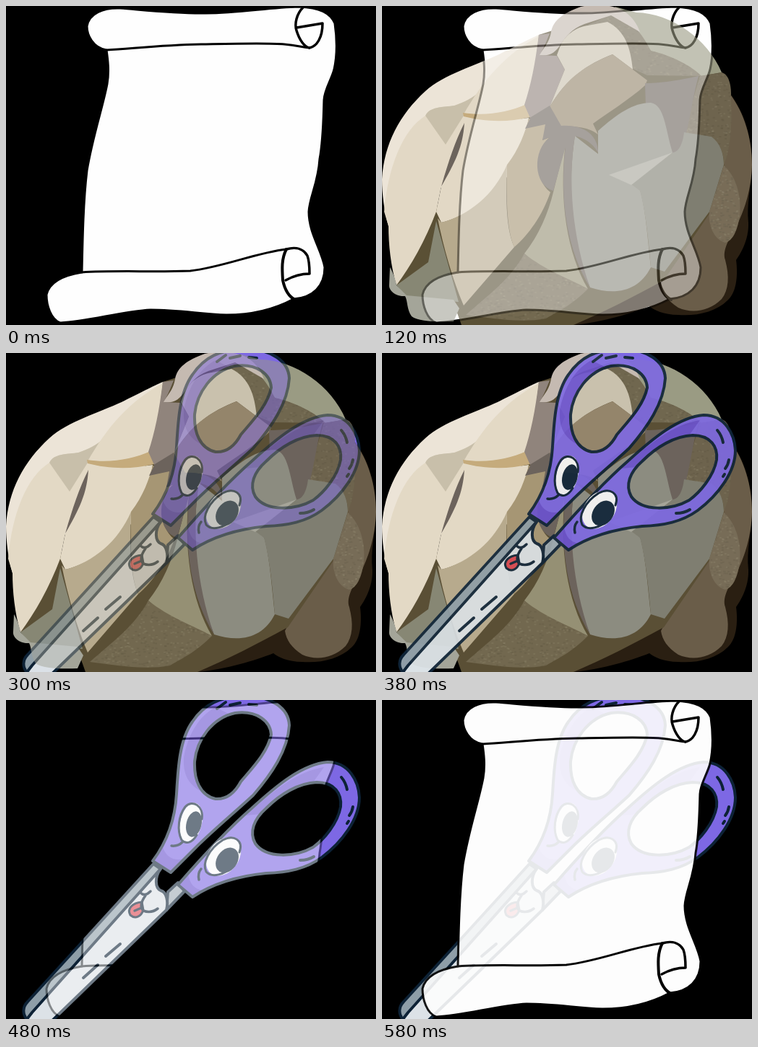
An HTML page with a canvas for the animation above (600 ms loop, 512 by 442 pixels).

```html
<!DOCTYPE html>
<html lang="en">
<head>
<meta charset="utf-8">
<title>Paper, rock, scissors</title>
<style>
html, body { margin: 0; width: 100%; height: 100%; overflow: hidden; background: #000; }
canvas { display: block; }
</style>
</head>
<body>
<canvas id="stage" width="512" height="442"></canvas>
<script>
const W = 512, H = 442;
const STEP = 20, FADE = 10, LOOP = 600;
const stage = document.getElementById('stage').getContext('2d');

function layer(paint) {
  const canvas = document.createElement('canvas');
  canvas.width = W;
  canvas.height = H;
  const c = canvas.getContext('2d');
  c.lineJoin = c.lineCap = 'round';
  paint(c);
  return canvas;
}

function fill(c, color, d) {
  c.fillStyle = color;
  c.fill(new Path2D(d), 'evenodd');
}

function line(c, color, width, d) {
  c.strokeStyle = color;
  c.lineWidth = width;
  c.stroke(new Path2D(d));
}

function shape(c, color, ink, width, d) {
  fill(c, color, d);
  line(c, ink, width, d);
}

function ellipse(c, color, x, y, rx, ry, degrees) {
  c.beginPath();
  c.ellipse(x, y, rx, ry, degrees * Math.PI / 180, 0, 7);
  c.fillStyle = color;
  c.fill();
}

// Rough stone: a flat facet with faint seeded specks.
function grain(c, color, d) {
  fill(c, color, d);
  c.save();
  c.clip(new Path2D(d));
  let seed = 7;
  const random = () => (seed = seed * 16807 % 2147483647) / 2147483647;
  for (let i = 0; i < 9000; i++) {
    c.fillStyle = i % 2 ? 'rgba(255,245,215,.06)' : 'rgba(30,20,0,.06)';
    c.fillRect(random() * W, random() * H, 3, 2);
  }
  c.restore();
}

function paintPaper(c) {
  const ink = '#000';
  shape(c, '#fefefe', ink, 3,
    'M139 61C120 58 112 40 112 28C115 10 135 2 158 3C195 6 230 10 270 10' +
    'C320 11 360 2 405 1C435 2 449 10 455 24C458 45 458 70 454 88' +
    'C450 103 441 115 440 130C439 160 439 185 434 212C432 245 420 265 419 285' +
    'C419 315 437 338 441 362C441 388 425 404 398 406C370 421 340 428 305 428' +
    'C270 427 240 421 200 421C160 423 115 437 75 439C62 434 56 415 56 400' +
    'C60 382 80 373 105 369C106 320 107 270 112 228C120 180 134 140 140 108C143 90 141 75 139 61Z');
  line(c, ink, 3, 'M139 61C175 59 215 54 270 53S365 51 385 53S408 57 420 58');
  line(c, ink, 3.5, 'M411 2C402 11 399 25 402 34C406 47 413 57 420 58C430 56 438 44 438 24L402 30');
  line(c, ink, 3, 'M105 369C150 366 205 369 255 367C300 362 345 342 388 337');
  line(c, ink, 4, 'M388 337C381 350 382 365 383 380C386 394 392 403 400 407');
  line(c, ink, 3.5, 'M388 337C402 333 412 337 417 346C420 354 420 362 420 371C408 371 396 375 387 380');
}

function paintRock(c) {
  const olive = '#5a4f35', plum = '#6c635c', cream = '#e3d9c5';
  // Shadowed back
  fill(c, '#2a1f12', 'M482 122C503 150 512 185 512 220C511 250 504 275 507 300C508 325 495 345 490 352C493 375 490 398 478 408C462 424 435 430 410 428C390 428 376 421 370 416C345 426 305 438 265 442L380 340Z');
  fill(c, '#6a5d49', 'M480 120C502 148 512 185 512 220C511 255 502 280 493 300C482 320 470 338 475 352C481 375 480 393 470 406C452 424 428 426 410 418C395 408 388 398 386 385L440 280Z');
  // Body
  fill(c, olive, 'M75 280L217 40L330 4L470 92L483 130L473 225L453 288L390 380C350 402 305 425 265 442H110L95 400L20 387Z');
  fill(c, '#ece4d7', 'M0 240C3 190 25 150 60 118C85 95 130 82 160 68C182 57 205 45 217 40L200 150L60 270L9 305C3 285 0 260 0 240Z');
  fill(c, cream, 'M3 285C8 225 28 172 60 152L88 190L132 120L113 163C100 200 92 225 82 250L75 285C60 325 40 360 20 387C12 360 9 330 9 305Z');
  fill(c, '#c8bfaa', 'M60 152C66 139 85 140 100 138C115 133 125 127 134 120L113 152L88 192Z');
  fill(c, cream, 'M113 150C138 105 172 65 217 42C213 80 207 112 197 138C178 148 150 153 113 150Z');
  fill(c, cream, 'M113 151C140 162 170 160 203 155C196 200 178 240 150 262C125 285 100 296 82 300L75 285L82 250C95 222 107 190 113 163Z');
  fill(c, '#c5ab7c', 'M112 148C145 153 175 147 200 136L205 154C172 162 140 160 113 153Z');
  fill(c, plum, 'M114 162C101 188 92 215 82 250C101 217 112 195 114 162Z');
  // Lower left
  fill(c, '#b7aa8d', 'M77 294L82 300C120 290 155 262 173 220C171 270 172 310 183 334L113 415C98 380 85 335 77 294Z');
  fill(c, '#a69674', 'M203 156L230 160L222 186L232 182C211 200 210 240 233 258C222 290 203 317 183 334C172 310 172 260 173 220C190 198 198 175 203 156Z');
  fill(c, '#878774', 'M75 298L106 410L35 405L20 387L64 355Z');
  fill(c, '#a4a599', 'M11 362C16 371 19 380 20 387L34 401L99 407L107 419L99 437C75 438 50 437 41 430C34 420 36 410 32 402C20 403 9 395 10 386Z');
  fill(c, '#959074', 'M254 190C244 270 257 345 285 392C255 380 222 368 197 343C217 318 230 287 237 258Z');
  grain(c, '#72684f', 'M197 343C225 366 260 378 285 392C265 412 250 420 227 433C190 440 150 432 116 428C150 398 178 378 197 343Z');
  // Top
  fill(c, '#9a9b83', 'M322 1L352 9C400 10 450 45 470 92L442 97L372 62Z');
  grain(c, '#70674f', 'M285 26L317 12C345 18 360 38 372 62C400 68 430 84 442 97L367 96L345 86Z');
  fill(c, '#c5bab1', 'M217 68C227 55 232 48 234 36C237 20 250 10 275 1C297 -4 325 -2 340 11C350 20 354 28 357 36L317 13L280 25C262 32 255 42 248 52C240 65 232 70 217 68Z');
  fill(c, '#90847c', 'M217 40L232 38C226 53 222 62 218 68L242 69L253 88L232 140L205 155L197 137C206 110 212 80 217 40Z');
  fill(c, '#c9c1ad', 'M248 52C258 35 275 28 285 27L312 22C337 35 344 58 347 88L319 67C285 80 255 100 232 140L253 88L242 68Z');
  fill(c, '#94856b', 'M319 67L367 103L364 110C342 130 312 148 292 163L299 178C284 166 262 167 247 166L232 140C255 100 280 83 319 67Z');
  // Right
  grain(c, '#6d634d', 'M440 97L470 92C481 95 484 112 483 130C485 165 482 200 473 220C474 205 466 190 456 181L416 177Z');
  grain(c, '#776c57', 'M473 221C489 235 498 262 495 290C492 312 485 325 475 328C460 324 451 305 453 285Z');
  fill(c, plum, 'M364 107C390 107 420 101 438 97C429 130 426 160 418 187C415 197 410 204 402 204L365 140Z');
  fill(c, '#8c8c80', 'M267 180L299 205V173C325 150 347 134 372 134C391 137 392 170 402 203L345 247C353 250 357 254 358 258C366 290 368 330 372 362C356 394 325 402 288 390C262 330 256 250 267 180Z');
  fill(c, '#7f7e71', 'M345 247L402 203C410 203 416 192 418 175L456 181C468 190 473 205 473 220L453 285L391 368L372 362C369 330 366 290 357 256Z');
  fill(c, '#a6a599', 'M314 234L402 203L345 248Z');
  fill(c, plum, 'M232 138L248 166C278 164 299 178 299 203C290 188 279 183 267 180C257 240 263 320 288 390C257 340 245 270 254 195L237 256C209 248 208 200 232 182L222 186L226 164L198 170L206 154Z');
}

function paintScissors(c) {
  const ink = '#0d2236', purple = '#7d68e4', shade = '#6a51d0';
  const outline = d => line(c, ink, 4, d);
  // Blades
  shape(c, '#8e9ea8', ink, 4, 'M204 227L30 418C23 425 22 435 30 444L48 436L214 234Z');
  shape(c, '#9eabb4', ink, 4, 'M224 266L238 253L247 265L222 291Z');
  shape(c, '#dce2e7', ink, 4, 'M213 235C206 246 206 260 214 264C222 266 225 278 222 291C180 332 120 390 62 446H26L36 433Z');
  // Handles
  const upper = 'M203 223C224 195 234 165 236 130C238 95 240 55 258 30C275 5 297 -5 330 -5C368 -6 391 12 392 35C390 70 367 103 342 132C315 157 287 180 262 205L228 239Z' +
    'M290 137C268 132 260 110 261 85C264 55 285 25 317 18C348 14 366 30 367 48C362 73 340 95 325 113C316 130 305 138 290 137Z';
  const lower = 'M238 256C265 225 302 183 340 150C375 118 410 89 445 86C475 86 488 113 489 135C489 165 465 197 437 218C415 234 390 239 360 240C320 244 285 255 258 273Z' +
    'M345 199C336 183 343 165 360 150C380 130 405 115 430 114C455 114 465 130 463 148C459 171 440 193 425 204C400 218 360 220 345 199Z';
  fill(c, purple, upper);
  fill(c, purple, lower);
  fill(c, shade, 'M246 80C252 45 270 20 290 10L310 20C277 34 262 60 261 85C260 105 263 117 269 126C250 115 245 100 246 80Z');
  fill(c, shade, 'M203 223L217 204C221 217 232 224 247 220L228 239Z');
  fill(c, shade, 'M332 160C370 125 405 98 440 93L425 114C400 118 368 140 352 158Z');
  fill(c, shade, 'M238 256L252 241C254 254 260 262 273 264L258 273Z');
  outline(upper);
  outline(lower);
  // Face
  ellipse(c, '#fbfbfb', 256, 170, 15, 28, 13);
  ellipse(c, ink, 260, 172, 10.5, 18, 13);
  ellipse(c, '#fbfbfb', 301, 217, 21, 29, 36);
  ellipse(c, ink, 306, 222, 14, 19, 36);
  line(c, ink, 3, 'M271 165C274 147 258 137 248 148C239 160 236 180 243 194C250 201 258 197 264 187');
  line(c, ink, 3, 'M323 211C329 194 315 186 300 194C281 206 271 226 277 238C285 247 303 242 314 230');
  line(c, ink, 3.5, 'M229 202Q238 203 244 197M267 249Q265 240 270 234');
  shape(c, '#dc4650', ink, 3, 'M188 280C175 281 167 289 172 298C179 304 187 300 190 291Z');
  line(c, ink, 3.5, 'M186 267Q192 273 200 265M193 271Q183 285 190 292Q201 296 210 289M178 292L185 289');
  // Highlights
  outline('M107 385L127 367M138 355L158 338M292 12L304 3M310 7L324 4M336 6L347 7' +
    'M464 107Q470 114 472 124M480 148Q479 155 475 160M474 168L472 171M407 222Q418 222 426 217');
}

const cards = [paintPaper, paintRock, paintScissors].map(layer);

function draw(now) {
  const step = Math.floor(now % LOOP / STEP);
  const index = Math.floor(step / FADE);
  const amount = step % FADE / FADE;
  const next = cards[(index + 1) % cards.length];

  stage.globalAlpha = 1;
  stage.globalCompositeOperation = 'source-over';
  stage.clearRect(0, 0, W, H);
  stage.drawImage(cards[index], 0, 0);

  // Outside the current card the next one pops in whole at the halfway point.
  if (amount >= 0.5) {
    stage.globalCompositeOperation = 'destination-over';
    stage.drawImage(next, 0, 0);
  }
  stage.globalCompositeOperation = 'source-atop';
  stage.globalAlpha = amount;
  stage.drawImage(next, 0, 0);

  stage.globalCompositeOperation = 'destination-over';
  stage.globalAlpha = 1;
  stage.fillStyle = '#000';
  stage.fillRect(0, 0, W, H);
}

let start;
function tick(now) {
  start ??= now;
  draw(now - start);
  requestAnimationFrame(tick);
}
draw(0);
requestAnimationFrame(tick);
</script>
</body>
</html>
```
